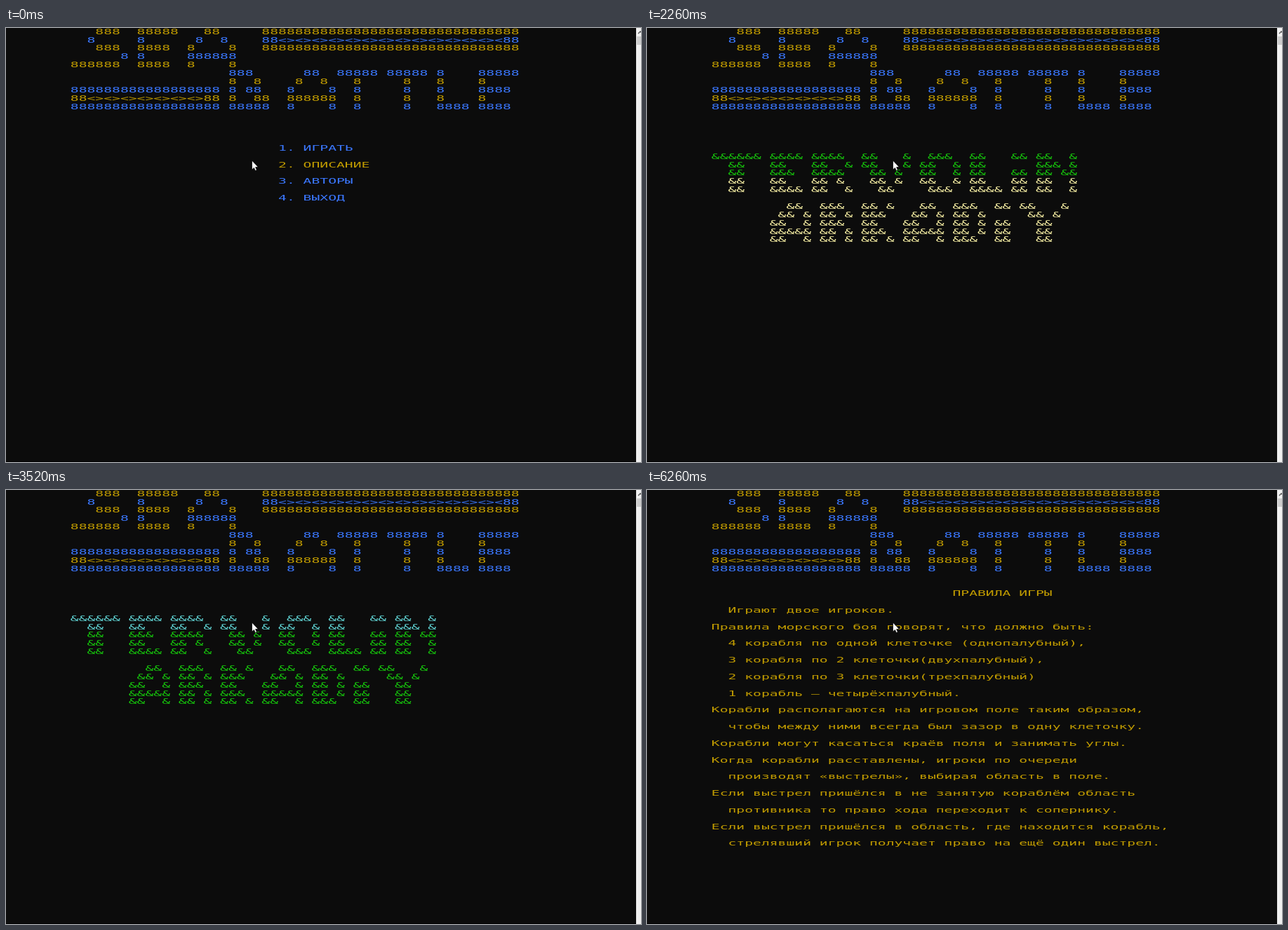
Write an HTML page with a canvas that moves like this. It is 905 px wide and 619 px high and loops after 8 s.

```html
<!DOCTYPE html>
<html lang="ru">
<head>
<meta charset="utf-8">
<title>Console menu</title>
<style>
  html, body { margin: 0; width: 100%; height: 100%; overflow: hidden; background: #0c0c0c; }
  canvas { display: block; }
</style>
</head>
<body>
<canvas id="stage" width="905" height="619"></canvas>
<script>
const ctx = document.getElementById('stage').getContext('2d');
const LOOP = 8000, TICK = 70;
const LEFT = 91.8, COL = 11.85, ROW = 11.87, BASE = 8.7;
const BG = '#0c0c0c', GOLD = '#c19c00', BLUE = '#3b78ff';
const SWEEP = ['#f9f1a5', '#16c60c', '#61d6d6'];

ctx.font = '11px "DejaVu Sans Mono", "Liberation Mono", monospace';
const WIDEN = COL / ctx.measureText('8').width;

// Console cells are square, so the narrow font is widened evenly.
function print(row, col, text, color) {
  ctx.save();
  ctx.translate(LEFT + col * COL, row * ROW + BASE);
  ctx.scale(WIDEN, 1);
  ctx.fillStyle = color;
  ctx.fillText(text, 0, 0);
  ctx.restore();
}

const e = n => '8'.repeat(n);

// Each title row is a list of "column:text" runs.
const title = [
  `3:888 8:88888 16:88 23:${e(31)}`,
  `2:8 8:8 15:8 18:8 23:88${'<>'.repeat(13)}<88`,
  `3:888 8:8888 14:8 19:8 23:${e(31)}`,
  '6:8 8:8 14:888888',
  '0:888888 8:8888 14:8 19:8',
  '19:888 28:88 32:88888 38:88888 44:8 49:88888',
  '19:8 22:8 27:8 30:8 34:8 40:8 44:8 49:8',
  `0:${e(18)} 19:8 21:88 26:8 31:8 34:8 40:8 44:8 49:8888`,
  `0:88${'<>'.repeat(7)}88 19:8 22:88 26:888888 34:8 40:8 44:8 49:8`,
  `0:${e(18)} 19:88888 26:8 31:8 34:8 40:8 44:8888 49:8888`
].map(line => line.split(' ').map(run => run.split(':')));

const menu = ['ИГРАТЬ', 'ОПИСАНИЕ', 'АВТОРЫ', 'ВЫХОД'];

const rules = [
  '  Играют двое игроков.',
  'Правила морского боя говорят, что должно быть:',
  '  4 корабля по одной клеточке (однопалубный),',
  '  3 корабля по 2 клеточки(двухпалубный),',
  '  2 корабля по 3 клеточки(трехпалубный)',
  '  1 корабль – четырёхпалубный.',
  'Корабли располагаются на игровом поле таким образом,',
  '  чтобы между ними всегда был зазор в одну клеточку.',
  'Корабли могут касаться краёв поля и занимать углы.',
  'Когда корабли расставлены, игроки по очереди',
  '  производят «выстрелы», выбирая область в поле.',
  'Если выстрел пришёлся в не занятую кораблём область',
  '  противника то право хода переходит к сопернику.',
  'Если выстрел пришёлся в область, где находится корабль,',
  '  стрелявший игрок получает право на ещё один выстрел.'
];

const glyphs = {
  T: '&&&&&&/  &&  /  &&  /  &&  /  &&  ',
  E: '&&&&/&&  /&&& /&&  /&&&&',
  R: '&&&& /&&  &/&&&& /&& & /&&  &',
  r: '&&& /&& &/&&& /&& &/&& &',
  V: '&&   &/&&   &/ && & / && & /  &&  ',
  O: ' &&& /&&  &/&&  &/&&  &/ &&& ',
  L: '&&  /&&  /&&  /&&  /&&&&',
  I: '&&/  /&&/&&/&&',
  N: '&&  &/&&& &/&& &&/&&  &/&&  &',
  A: '  && / && &/&&  &/&&&&&/&&  &',
  K: '&& &/&&& /&&  /&&& /&& &',
  D: '&&& /&& &/&& &/&& &/&&& ',
  Y: '&&   &/ && & /  &&  /  &&  /  &&  '
};
const banner = word => [0, 1, 2, 3, 4].map(i =>
  [...word].map(c => glyphs[c].split('/')[i]).join(' '));
const authors = [
  ...banner('TERVOLIN').map((text, i) => ({ row: 15 + i, col: 0, text })),
  ...banner('ArKADIY').map((text, i) => ({ row: 21 + i, col: 7, text }))
];

function drawTitle() {
  title.forEach((runs, row) => {
    for (const [col, text] of runs) print(row, +col, text, row % 2 ? BLUE : GOLD);
  });
}

function drawMenu(selected) {
  menu.forEach((name, i) =>
    print(14 + 2 * i, 25, `${i + 1}. ${name}`, i + 1 === selected ? GOLD : BLUE));
}

// Rows are rewritten from the top, one colour per pass.
function drawAuthors(elapsed) {
  const written = Math.floor(elapsed / 32);
  authors.forEach((line, i) => {
    const pass = Math.floor((written - 1 - i) / authors.length);
    if (pass >= 0) print(line.row, line.col, line.text, SWEEP[pass % SWEEP.length]);
  });
}

function drawRules(count) {
  print(12, 29, 'ПРАВИЛА ИГРЫ', GOLD);
  rules.slice(0, count).forEach((text, i) => print(14 + 2 * i, 0, text, GOLD));
}

function polygon(points) {
  ctx.beginPath();
  points.forEach(([x, y]) => ctx.lineTo(x, y));
}

function drawWindow() {
  ctx.fillStyle = '#000';
  ctx.fillRect(0, 618, 898, 1);
  ctx.fillStyle = '#f0f0f0';
  ctx.fillRect(898, 0, 7, 619);
  ctx.fillStyle = '#cdcdcd';
  ctx.fillRect(899, 12, 6, 12);
  ctx.strokeStyle = '#505050';
  ctx.lineWidth = 1.3;
  polygon([[901, 8], [904, 5], [907, 8]]);
  ctx.stroke();
}

function drawPointer() {
  polygon([[350.5, 189], [350.5, 202], [353.4, 199.4], [355.3, 203.5],
    [357.4, 202.6], [355.6, 198.6], [359.3, 198.2]]);
  ctx.closePath();
  ctx.fillStyle = '#fff';
  ctx.fill();
  ctx.strokeStyle = '#000';
  ctx.lineWidth = 0.7;
  ctx.stroke();
}

function drawScreen(t) {
  if (t >= 1840 && t < 3800) {
    const elapsed = Math.floor((t - 1840) / TICK) * TICK;
    if (!elapsed) return;
    drawTitle();
    drawAuthors(elapsed);
  } else if (t >= 6050) {
    const step = Math.min(3, Math.floor((t - 6050) / TICK));
    if (!step) return;
    drawTitle();
    if (step > 1) drawRules(step > 2 ? rules.length : 7);
  } else {
    drawTitle();
    drawMenu(t < 920 ? 2 : t < 1840 ? 3 : t < 4530 ? 1 : t < 5060 ? 2 : t < 5790 ? 3 : 2);
  }
}

const start = performance.now();
function frame() {
  ctx.fillStyle = BG;
  ctx.fillRect(0, 0, 905, 619);
  drawScreen((performance.now() - start) % LOOP);
  drawWindow();
  drawPointer();
  requestAnimationFrame(frame);
}
frame();
</script>
</body>
</html>
```
